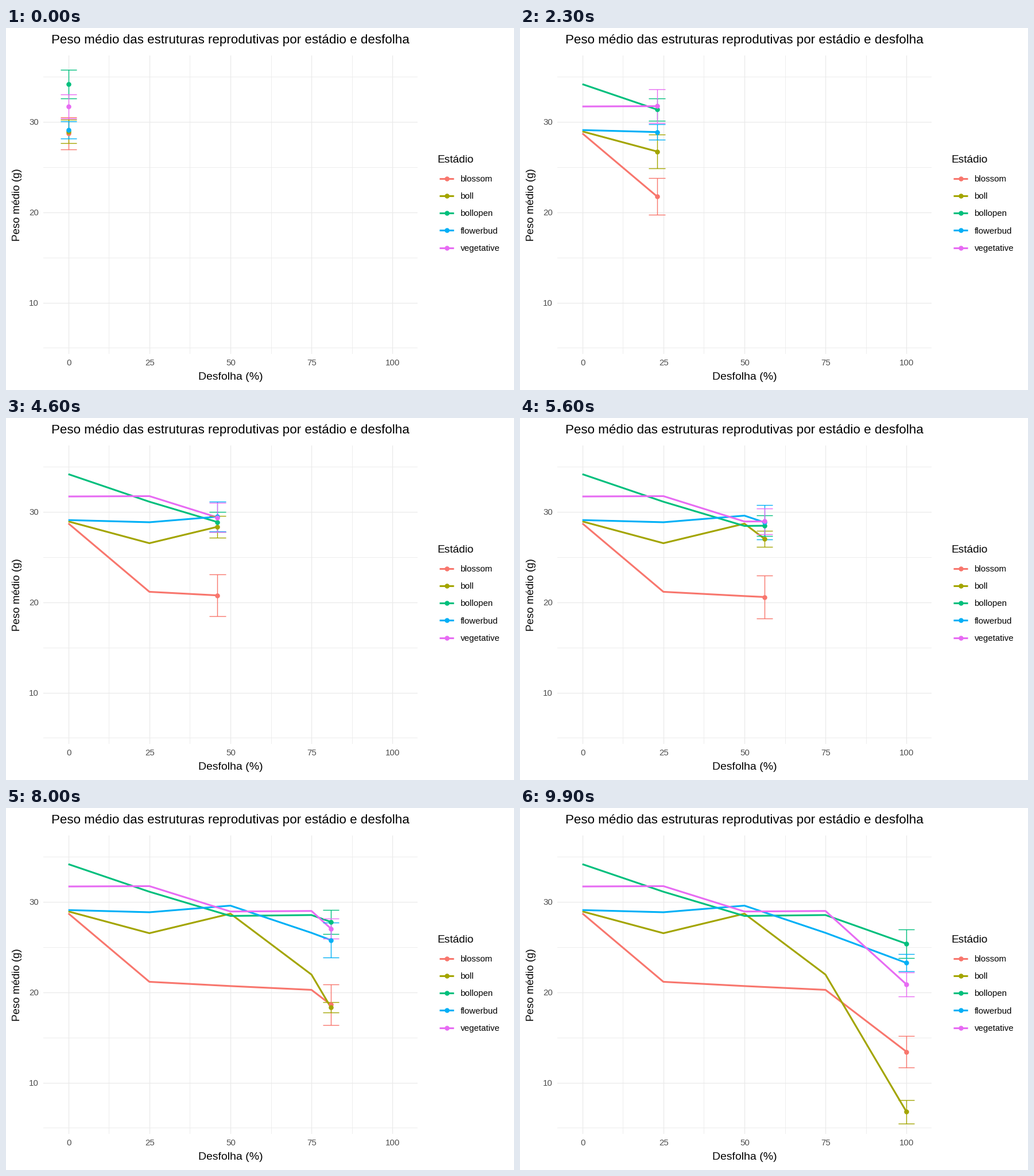
A matplotlib script that plays this animation: 885x632 px, repeating every 10000 ms.

```python
import numpy as np
import matplotlib.pyplot as plt
from matplotlib.animation import FuncAnimation

W, H, DPI = 885, 632, 100
FRAMES, INTERVAL = 100, 100
PX = 72 / DPI  # points per pixel

plt.rcParams["font.family"] = "Liberation Sans"

DOSE = np.linspace(0, 100, 5)
KEYS = np.round(DOSE * (FRAMES - 1) / 100)  # frame at which each dose is reached
CAP = 2.5

# name: colour, mean weight at each dose, waves of the error bar
GROUPS = {
    "blossom": ("#F8766D", (28.73, 21.16, 20.69, 20.27, 13.42), (1.76, 0.63, -0.17)),
    "boll": ("#A3A500", (28.95, 26.54, 28.7, 21.96, 6.77), (1.3, -0.24, 0.78)),
    "bollopen": ("#00BF7D", (34.18, 31.13, 28.45, 28.55, 25.37), (1.58, -0.48, -0.03)),
    "flowerbud": ("#00B0F6", (29.1, 28.86, 29.59, 26.58, 23.25), (0.95, 0.84, -0.7)),
    "vegetative": ("#E76BF3", (31.71, 31.75, 28.94, 29.0, 20.87), (1.32, 0.22, 0.43)),
}

LINE = dict(lw=3.1 * PX, solid_capstyle="butt", solid_joinstyle="round")
DOT = dict(marker="o", ms=8.5 * PX, mew=0, ls="none")
BAR = dict(lw=1.4 * PX, solid_capstyle="butt")

fig = plt.figure(figsize=(W / DPI, H / DPI), dpi=DPI, facecolor="white")

# Page layer in pixels, y downwards, for text and legend
page = fig.add_axes([0, 0, 1, 1])
page.set(xlim=(0, W), ylim=(H, 0))
page.axis("off")

# Plot panel
left, right, top, bottom = 64.9, 717.1, 48.1, 568.6
ax = fig.add_axes([left / W, 1 - bottom / H, (right - left) / W, (bottom - top) / H])
ax.set(xlim=(-7.75, 107.75), ylim=(4.352, 37.347))
ax.axis("off")


def label(x, y, text, size, color="black", ha="center", **kw):
    page.text(x, y, text, fontsize=size * PX, color=color, ha=ha,
              va="baseline", **kw)


def grid(xs, ys, width):
    style = dict(color="#EBEBEB", lw=width * PX, zorder=1)
    for x in xs:
        ax.axvline(x, **style)
    for y in ys:
        ax.axhline(y, **style)


def spread(base, rise, skew):
    """Error bar half-length at each dose."""
    a = np.pi * DOSE / 100
    return base + rise * np.sin(a) + skew * np.sin(2 * a)


grid(DOSE[:-1] + 12.5, range(5, 36, 10), 0.9)
grid(DOSE, range(10, 31, 10), 1.4)

label(391.3, 27.3, "Peso médio das estruturas reprodutivas por estádio e desfolha", 22.4)
label(391.5, 614, "Desfolha (%)", 19.4)
label(24.5, 308.7, "Peso médio (g)", 18.8, rotation=90, rotation_mode="anchor")
for d in DOSE:
    label(109.2 + 5.646 * d, 589, f"{d:.0f}", 15, "#4D4D4D")
for v in range(10, 31, 10):
    label(57, 169.3 + 15.775 * (30 - v), str(v), 15, "#4D4D4D", "right")

label(751, 235, "Estádio", 19.1, ha="left")

series = []
for k, (name, (color, mean, waves)) in enumerate(GROUPS.items()):
    y = 262.7 + 30.2 * k
    page.plot([755, 780], [y, y], color=color, **LINE)
    page.plot(767.5, y, color=color, **DOT)
    label(791.5, y + 5.3, name, 15, ha="left")

    line, = ax.plot([], [], color=color, zorder=2, **LINE)
    bar, = ax.plot([], [], color=color, zorder=3, **BAR)
    dot, = ax.plot([], [], color=color, zorder=4, **DOT)
    series.append((line, bar, dot, mean, spread(*waves)))


def draw(i):
    x = np.interp(i, KEYS, DOSE)
    past = DOSE < x
    gap = np.nan
    for line, bar, dot, mean, err in series:
        y = np.interp(x, DOSE, mean)
        e = np.interp(x, DOSE, err)
        lo, hi = y - e, y + e
        line.set_data(np.append(DOSE[past], x), np.append(np.array(mean)[past], y))
        bar.set_data([x - CAP, x + CAP, gap, x, x, gap, x - CAP, x + CAP],
                     [hi, hi, gap, hi, lo, gap, lo, lo])
        dot.set_data([x], [y])
    return [a for s in series for a in s[:3]]


anim = FuncAnimation(fig, draw, frames=FRAMES, interval=INTERVAL,
                     repeat=True, repeat_delay=0)
plt.show()
```
